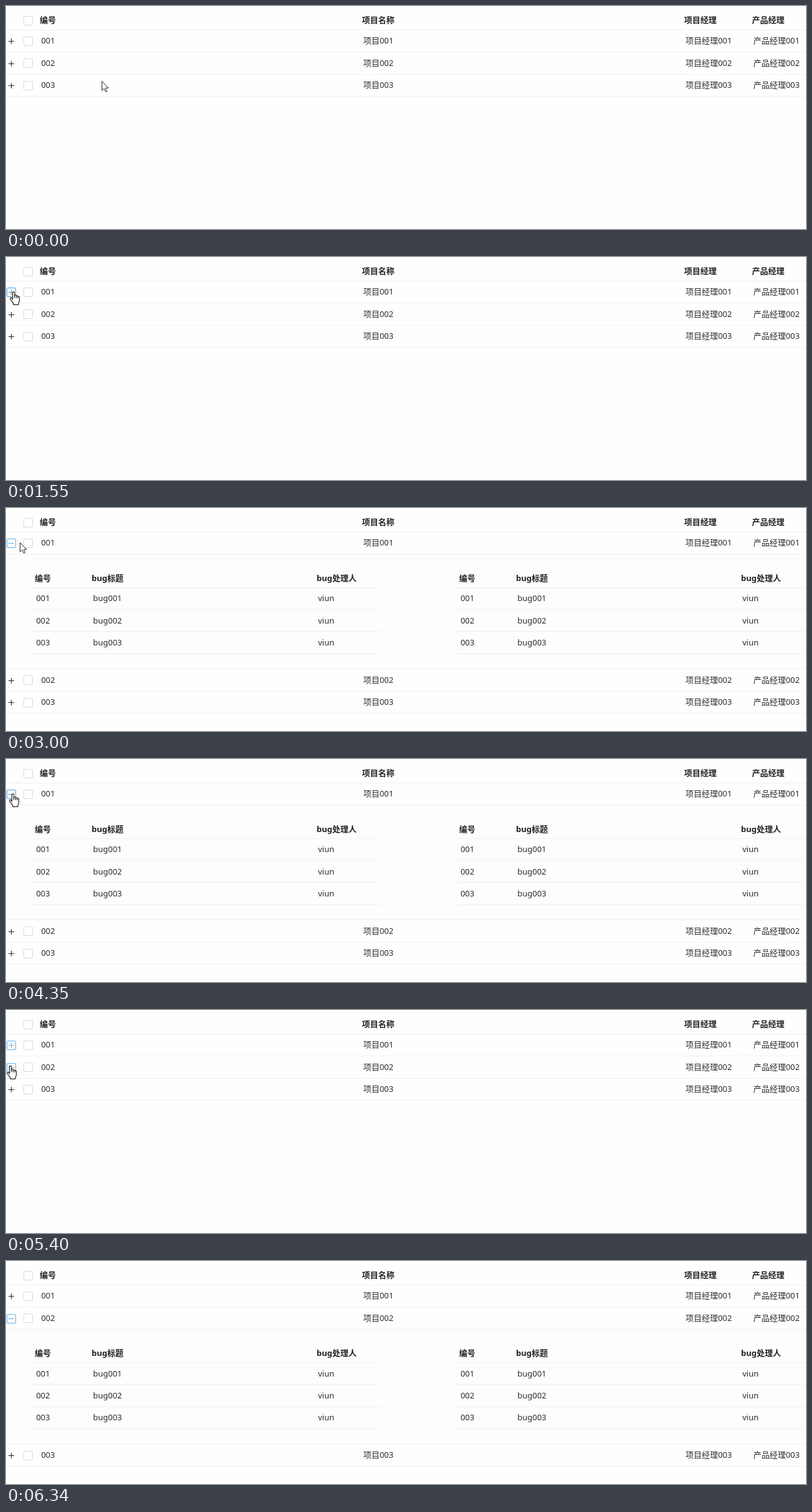
Recreate the animation shown at these times as an HTML page. Size 1280 by 357 pixels, loop 8 s.

```html
<!DOCTYPE html>
<html lang="zh-CN">
<head>
<meta charset="utf-8">
<title>可展开表格</title>
<style>
  html, body { margin: 0; width: 100%; height: 100%; overflow: hidden; background: #fefefe; }
  svg { display: block; }
  text { font: 13px "Noto Sans", "Noto Sans CJK SC", "Noto Sans CJK", sans-serif; fill: #2b2b2b; }
  .head { font-weight: bold; fill: #222; }
  .rule { fill: #f0f0f0; }
  .check { fill: #fff; stroke: #d9d9d9; }
  .cursor { fill: #fff; stroke: #222; stroke-linejoin: round; }
</style>
</head>
<body>
<svg id="stage" width="1280" height="357" viewBox="0 0 1280 357"></svg>
<script>
const LOOP = 8000, FADE = 300;
const TABLE_TOP = 38.4, PITCH = 35.33, DETAIL_HEIGHT = 184;
const stage = document.getElementById('stage');

function add(parent, tag, attrs = {}, content = '') {
  const node = document.createElementNS('http://www.w3.org/2000/svg', tag);
  for (const key in attrs) node.setAttribute(key, attrs[key]);
  node.textContent = content;
  parent.append(node);
  return node;
}
const moveTo = (node, x, y) => node.setAttribute('transform', `translate(${x} ${y})`);

// A block sits at a fractional height; each of its parts snaps to whole pixels.
function makeBlock() {
  const group = add(stage, 'g'), parts = [];
  const put = (offset, tag, attrs, content) => {
    const node = add(group, tag, attrs, content);
    parts.push([node, offset]);
    return node;
  };
  return {
    group, put,
    label: (x, y, content, cls = '') => put(y, 'text', { x, class: cls }, content),
    rule: (x, y, width) => put(y, 'rect', { x, width, height: 1, class: 'rule' }),
    checkbox: y => put(y, 'rect', { x: 28.5, y: .5, width: 14, height: 14, rx: 1.5, class: 'check' }),
    place: top => parts.forEach(([node, offset]) => moveTo(node, 0, Math.floor(top + offset)))
  };
}

// Main table
const columns = [[54, '编号', ''], [569.5, '项目名称', '项目'],
                 [1085, '项目经理', '项目经理'], [1193.5, '产品经理', '产品经理']];
const header = makeBlock();
header.checkbox(16);
for (const [x, title] of columns) header.label(x, 27, title, 'head');
header.rule(0, TABLE_TOP, 1280);
header.place(0);

// Nested tables
const detail = makeBlock();
detail.put(1, 'rect', { width: 1280, height: DETAIL_HEIGHT - 1, fill: '#fdfdfd' });
detail.rule(0, DETAIL_HEIGHT, 1280);
const bugColumns = [[46, '编号', i => '00' + i], [137, 'bug标题', i => 'bug00' + i],
                    [497, 'bug处理人', () => 'viun']];
for (const left of [0, 679]) {
  for (const [x, title, value] of bugColumns) {
    detail.label(left + x, 43.4, title, 'head');
    for (let i = 1; i <= 3; i++)
      detail.label(left + x + 2.2, 40.7 + i * PITCH, value(i));
  }
  for (let i = 0; i <= 3; i++) detail.rule(left + 42, 53.4 + i * PITCH, 558);
}

const rows = [1, 2, 3].map(n => {
  const block = makeBlock();
  for (const [x, , prefix] of columns) block.label(x + 2.2, 22.3, prefix + '00' + n);
  block.checkbox(11);
  block.rule(0, PITCH, 1280);
  const border = block.put(11.3, 'rect', { x: 1.5, y: .5, width: 14, height: 14, rx: 1.5, fill: 'none' });
  const sign = block.put(11.3, 'path', { fill: 'none' });
  return { block, border, sign };
});

const pointers = {
  arrow: add(stage, 'path', { class: 'cursor',
    d: 'M.5 .5V15.2L3.9 12L6.4 17.4L8.7 16.4L6.3 11.2H10.8Z' }),
  hand: add(stage, 'path', { class: 'cursor', 'stroke-width': 1.2,
    d: 'M4.5 13V2C4.5 .1 7.5 .1 7.5 2V6.6C8 5.5 10.2 5.7 10.4 7.2C11 6.4 12.9 6.8 13 8.2' +
       'C13.8 7.6 15.5 8 15.5 9.6V14.5C15.5 17 13.7 18 13.7 21.4H6.3C6.3 18.5 3 16 1 12.8' +
       'C-.2 10.8 2.2 9.6 3.3 11.2ZM7.5 6.6V10.5M10.4 7.2V10.8M13 8.2V11' })
};

// Screen updates happen only at these moments
const ticks = [0, 120, 270, 420, 570, 690, 810, 930, 1550, 1700, 1820, 1970, 2220, 3000, 3400,
  3550, 3670, 4350, 4470, 4590, 4710, 4860, 4980, 5130, 5280, 5400, 5650, 5800, 5920, 6070, 6190, 6340];

const cursorPath = [
  [0, 'arrow', 153, 120], [120, 'arrow', 123, 82], [270, 'arrow', 46, 62], [420, 'arrow', 22, 55],
  [570, 'hand', 6, 55], [1970, 'arrow', 25, 55], [2220, 'arrow', 23, 55], [3000, 'arrow', 22, 55],
  [3400, 'arrow', 20, 55], [3550, 'hand', 4, 55], [3670, 'hand', 5, 55], [4860, 'arrow', 4, 78],
  [4980, 'hand', 0, 88], [5130, 'hand', 0, 89], [5280, 'hand', 1, 89],
  [6070, 'arrow', 33, 170], [6190, 'arrow', 69, 290], [6340, 'none', 0, 0]
];
const expansion = [[0, -1], [1700, 0], [4470, -1], [5800, 1]];

const IDLE = { border: [254, 254, 254], sign: [34, 34, 34] };
const HOVER = { border: [88, 178, 246], sign: [88, 178, 246] };
const PRESS = { border: [42, 140, 226], sign: [42, 140, 226] };
const iconStates = [
  [[0, IDLE], [500, HOVER], [1400, PRESS], [1600, HOVER], [4200, PRESS], [4450, HOVER], [5550, IDLE]],
  [[0, IDLE], [4950, HOVER], [5500, PRESS], [5750, HOVER]],
  [[0, IDLE]]
];

const lastIndex = (list, t) => list.findLastIndex(([start]) => start <= t);
const current = (list, t) => list[lastIndex(list, t)];

function iconColor(states, t, part) {
  const i = lastIndex(states, t);
  const [start, to] = states[i];
  const from = states[Math.max(0, i - 1)][1];
  const duration = part === 'sign' && to === IDLE ? FADE / 2 : FADE;
  const k = Math.min(1, (t - start) / duration);
  return `rgb(${to[part].map((c, j) => Math.round(from[part][j] + (c - from[part][j]) * k))})`;
}

function render(time) {
  const t = ticks.findLast(tick => tick <= time);
  const open = current(expansion, t)[1];

  rows.forEach(({ block, border, sign }, i) => {
    const shift = open >= 0 && i > open ? DETAIL_HEIGHT : 0;
    block.place(TABLE_TOP + i * PITCH + shift);
    border.setAttribute('stroke', iconColor(iconStates[i], t, 'border'));
    sign.setAttribute('stroke', iconColor(iconStates[i], t, 'sign'));
    sign.setAttribute('d', i === open ? 'M4 7.5h9' : 'M4 7.5h9M8.5 3v9');
  });

  detail.group.style.display = open < 0 ? 'none' : '';
  detail.place(TABLE_TOP + (open + 1) * PITCH);

  const [, shape, x, y] = current(cursorPath, t);
  for (const name in pointers) {
    pointers[name].style.display = name === shape ? '' : 'none';
    moveTo(pointers[name], x, y);
  }
}

const origin = performance.now();
function frame() {
  render((performance.now() - origin) % LOOP);
  requestAnimationFrame(frame);
}
frame();
</script>
</body>
</html>
```
